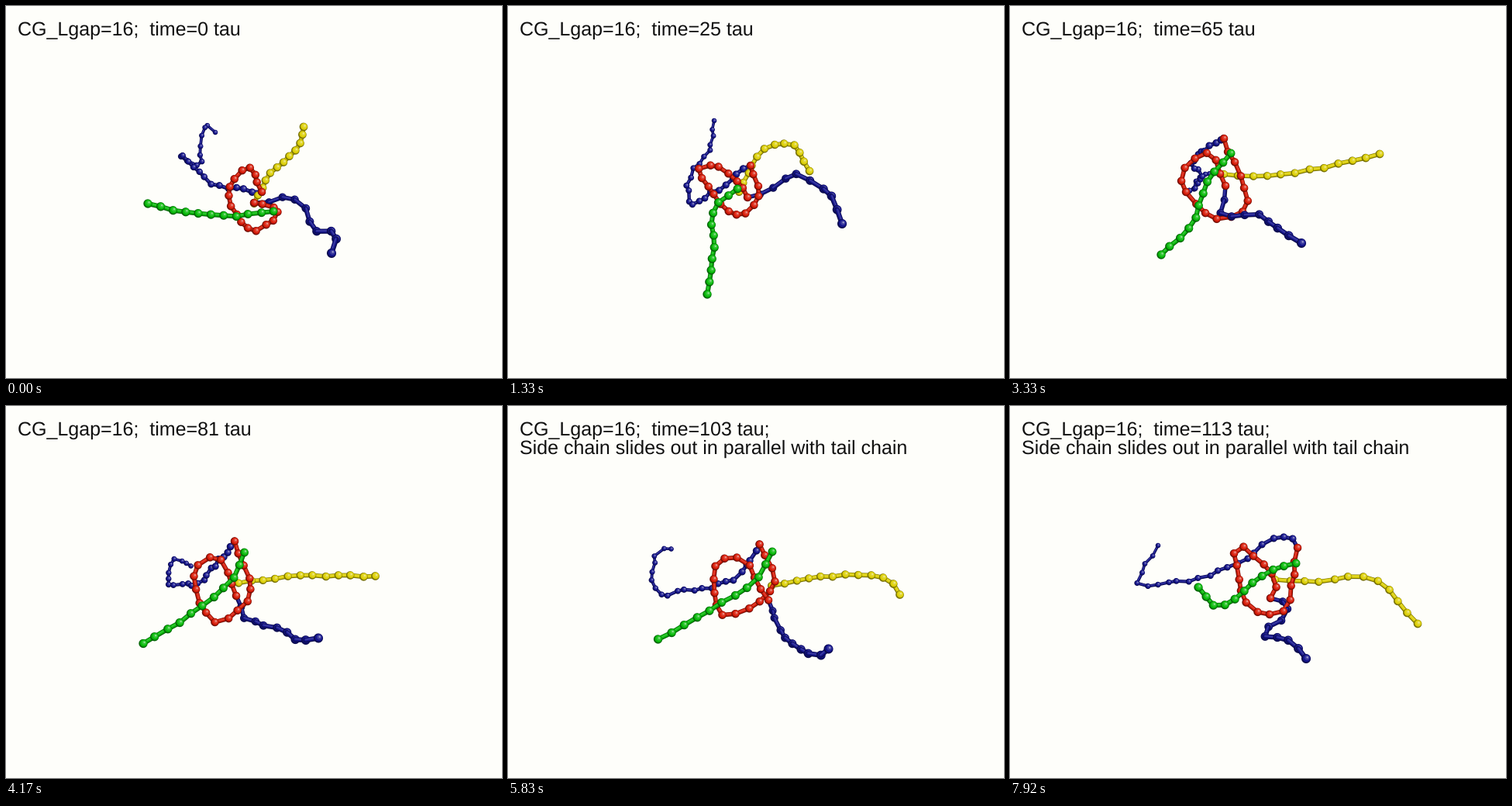
A matplotlib script that plays this animation: 640 px wide and 480 px high, repeating every 8000 ms.

```python
import numpy as np
import matplotlib.pyplot as plt
from matplotlib.animation import FuncAnimation
from matplotlib.collections import LineCollection

plt.rcParams["text.hinting"] = "none"
plt.rcParams["text.hinting_factor"] = 1

W, H, DPI = 640, 480, 100
PX = 72 / DPI
INTERVAL, LOOP, STEPS = 50, 8000, 96
SLOW = 61  # step at which the run is shown in slow motion

RED, BLUE, GREEN, YELLOW = "#d81c08", "#14148c", "#08ba0a", "#dccf06"
# beads, radius at root and tip, thermal kink, colour
CHAINS = dict(ring=(19, 5.2, 5.2, 1.5, RED), tail=(22, 4.8, 3.2, 2.2, BLUE),
              head=(10, 4.8, 6, 2, BLUE), green=(11, 5.4, 5.6, 1, GREEN),
              yellow=(12, 5, 5.3, 1, YELLOW))

POSES = {}


def pose(step, **bends):
    """Key bends of every chain; tail and head grow from the two ends of the ring."""
    bends["tail"] = [bends["ring"][0]] + bends["tail"]
    bends["head"] = [bends["ring"][-1]] + bends["head"]
    POSES[step] = {k: np.array(v, float) for k, v in bends.items()}


pose(0,
     ring=[(330, 240), (312, 207), (288, 242), (318, 290), (352, 264), (320, 254)],
     tail=[(266, 228), (223, 190), (248, 208), (257, 154), (270, 163)],
     head=[(382, 251), (400, 291), (429, 294), (420, 319)],
     green=[(345, 265), (282, 271), (212, 263), (183, 255)],
     yellow=[(320, 255), (345, 212), (379, 181), (384, 156)])
pose(16,
     ring=[(313, 206), (323, 243), (297, 271), (247, 209), (281, 212), (309, 247)],
     tail=[(277, 232), (235, 257), (234, 221), (260, 185), (266, 148)],
     head=[(344, 236), (370, 218), (418, 245), (431, 281)],
     green=[(296, 236), (265, 262), (266, 310), (257, 372)],
     yellow=[(298, 240), (329, 187), (365, 178), (389, 213)])
pose(28,
     ring=[(252, 190), (302, 212), (284, 254), (219, 222), (262, 204), (303, 236)],
     tail=[(238, 205), (248, 235), (234, 196), (294, 190), (286, 172)],
     head=[(324, 252), (361, 282), (385, 270), (407, 291)],
     green=[(269, 198), (261, 250), (268, 318), (304, 369)],
     yellow=[(284, 230), (299, 193), (386, 205), (426, 245)])
pose(40,
     ring=[(276, 171), (306, 258), (268, 274), (220, 222), (255, 190), (278, 232)],
     tail=[(232, 204), (247, 219), (233, 240), (250, 220), (265, 214)],
     head=[(275, 268), (326, 269), (345, 287), (376, 306)],
     green=[(285, 190), (254, 229), (236, 279), (195, 321)],
     yellow=[(276, 217), (330, 219), (397, 210), (477, 191)])
pose(60,
     ring=[(314, 178), (324, 238), (266, 281), (264, 212), (290, 200), (316, 258)],
     tail=[(302, 216), (243, 238), (190, 218), (190, 175), (212, 199)],
     head=[(344, 280), (368, 305), (412, 316), (430, 293)],
     green=[(330, 188), (327, 222), (247, 254), (159, 292)],
     yellow=[(324, 240), (408, 221), (468, 229), (476, 248)])
pose(80,
     ring=[(335, 179), (364, 222), (285, 260), (273, 195), (312, 196), (356, 243)],
     tail=[(284, 230), (235, 235), (194, 262), (194, 205), (209, 170)],
     head=[(343, 258), (340, 285), (372, 328), (397, 334)],
     green=[(352, 188), (318, 222), (276, 272), (228, 310)],
     yellow=[(356, 224), (420, 219), (504, 214), (535, 239)])
pose(95,
     ring=[(371, 183), (352, 263), (310, 260), (292, 181), (342, 224), (336, 248)],
     tail=[(355, 167), (281, 210), (222, 226), (165, 228), (191, 180)],
     head=[(361, 260), (327, 296), (362, 304), (382, 326)],
     green=[(369, 203), (326, 218), (268, 260), (243, 234)],
     yellow=[(342, 224), (405, 226), (467, 222), (526, 281)])

KEYS = sorted(POSES)
rng = np.random.default_rng(4)
KINKS = {k: (rng.uniform(0.2, 0.8, (c[0], 2)), rng.uniform(0, 2 * np.pi, (c[0], 2)))
         for k, c in CHAINS.items()}


def tau(step):
    if step < SLOW:
        return max(step - 1, 0) * 5 / 3
    return 100 + (step - SLOW - 1) * 0.4


def spread(bends, count):
    """Evenly spaced beads on a smooth curve through the bends."""
    size = np.hypot(*np.diff(bends, axis=0).T)
    t = np.r_[0, np.cumsum(np.sqrt(size))]
    slope = np.gradient(bends, t, axis=0)
    curve = []
    for i, h in enumerate(np.diff(t)):
        u = np.linspace(0, 1, 25)[:, None]
        curve.append((1 + 2 * u) * (1 - u) ** 2 * bends[i]
                     + u * (1 - u) ** 2 * h * slope[i]
                     + u ** 2 * (3 - 2 * u) * bends[i + 1]
                     + u ** 2 * (u - 1) * h * slope[i + 1])
    curve = np.concatenate(curve)
    along = np.r_[0, np.cumsum(np.hypot(*np.diff(curve, axis=0).T))]
    at = np.linspace(0, along[-1], count)
    return np.c_[np.interp(at, along, curve[:, 0]), np.interp(at, along, curve[:, 1])]


def beads(name, step):
    count, _, _, kink, _ = CHAINS[name]
    i = min(np.searchsorted(KEYS, step, side="right") - 1, len(KEYS) - 2)
    lo, hi = KEYS[i], KEYS[i + 1]
    u = (step - lo) / (hi - lo)
    p = spread(POSES[lo][name] * (1 - u) + POSES[hi][name] * u, count)
    speed, phase = KINKS[name]
    p[1:-1] += kink * np.sin(speed * tau(step) + phase)[1:-1]
    return p


def tint(color, k):
    """Darken (k < 0) or lighten (k > 0) a colour."""
    c = np.array([int(color[i:i + 2], 16) for i in (1, 3, 5)]) / 255
    return tuple(c * (1 + k) if k < 0 else c + (1 - c) * k)


SHADES = {c: [tint(c, k) for k in (-0.45, 0, 0.16, 0.55)] for c in (RED, BLUE, GREEN, YELLOW)}


def bond(a, b, r, color):
    d = b - a
    side = np.array([d[1], -d[0]]) / (np.hypot(*d) + 1e-6)
    side *= r * (-1 if side[1] > 0 else 1)
    return [((a + k * side, b + k * side), w * r, c)
            for k, w, c in zip((0, 0.06, 0.12), (1.1, 0.75, 0.32), SHADES[color])]


def ball(p, r, color):
    dot = np.array([0.1, 0.1])
    lit = np.array([r, -r])
    return [((p + k * lit - dot, p + k * lit + dot), w * r, c)
            for k, w, c in zip((0, 0.1, 0.2, 0.28), (2, 1.62, 1.05, 0.42), SHADES[color])]


def model_lines(step):
    items = []
    for name, (count, r0, r1, _, color) in CHAINS.items():
        p = beads(name, step)
        radii = np.linspace(r0, r1, count)
        for i, r in enumerate(radii):
            items.append((r, ball(p[i], r, color)))
            if i:
                items.append((r - 0.1, bond(p[i - 1], p[i], r, color)))
    items.sort(key=lambda item: item[0])  # larger means nearer
    return [line for _, group in items for line in group]


fig = plt.figure(figsize=(W / DPI, H / DPI), dpi=DPI, facecolor="#fefefa")
ax = fig.add_axes([0, 0, 1, 1])
ax.set_xlim(0, W)
ax.set_ylim(H, 0)
ax.axis("off")
model = LineCollection([], capstyle="round")
model.set_snap(False)
ax.add_collection(model, autolim=False)


def label(y):
    return ax.text(15, y, "", family="Liberation Sans", size=25 * PX,
                   color="#101010", va="baseline")


title, note = label(38), label(62)


def draw(n):
    step = round(n * INTERVAL * STEPS / LOOP)
    step = min(step, STEPS - 1)
    segs, widths, colors = zip(*model_lines(step))
    model.set_segments(segs)
    model.set_linewidths([w * PX for w in widths])
    model.set_color(colors)
    slow = step >= SLOW
    title.set_text(f"CG_Lgap=16;  time={int(tau(step) + 1e-6)} tau" + ";" * slow)
    note.set_text("Side chain slides out in parallel with tail chain" * slow)
    return model, title, note


anim = FuncAnimation(fig, draw, frames=LOOP // INTERVAL, interval=INTERVAL,
                     init_func=lambda: draw(0), repeat=True, repeat_delay=0)
plt.show()
```
